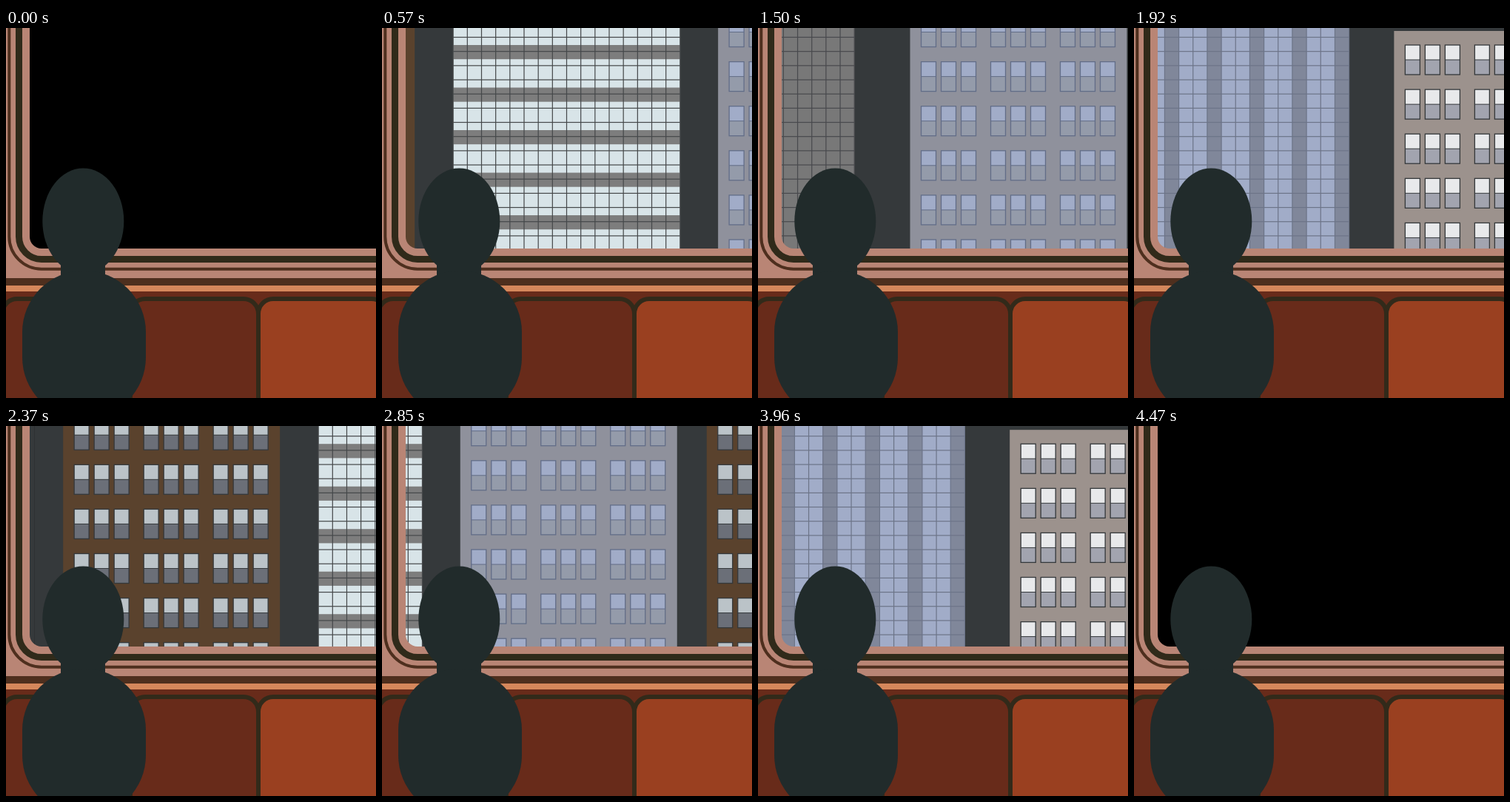
An HTML page with a canvas that plays this animation: 500 px wide and 500 px high, repeating every 4.5 s.

```html
<!DOCTYPE html>
<html lang="en">
<head>
<meta charset="utf-8">
<title>Train window</title>
<style>
  html, body { margin: 0; width: 100%; height: 100%; overflow: hidden; background: #000; }
  canvas { display: block; width: 500px; height: 500px; }
</style>
</head>
<body>
<canvas id="stage" width="500" height="500"></canvas>
<script>
const ctx = document.getElementById('stage').getContext('2d');

const LOOP = 4500, STEP = 30;
const SPEED = 1.405;              // px per ms
const CITY_LEFT = -1075, CITY_WIDTH = 2855;
const CELL = 19.17;

const BROWN = { wall: '#5a422d', top: '#bbc3c8', bottom: '#6b6f78', line: '#34383b', y: -9 };
const BLUE = { wall: '#8f919c', top: '#a1acc8', bottom: '#949baa', line: '#626d88', y: -14.5 };
const ORANGE = { wall: '#9c928d', top: '#e8e9eb', bottom: '#a2a4af', line: '#34383b', y: 23 };

const GRID = { wall: '#787878', line: '#48494d' };
const GLASS = { wall: '#a1acc8', line: '#6c7488', band: '#80879a', columns: true };
const WHITE = { wall: '#d8e4e8', line: '#45484a', band: '#7d7d7d' };

function rect(color, x, y, w, h) {
  ctx.fillStyle = color;
  ctx.fillRect(x, y, w, h);
}

function house(x, style) {
  rect(style.wall, x, style.y - 19, 293, 400);
  ctx.strokeStyle = style.line;
  ctx.lineWidth = 1.3;
  for (let row = 0; row < 6; row++) {
    for (let i = 0; i < 9; i++) {
      const wx = x + 15 + Math.floor(i / 3) * 94 + (i % 3) * 27;
      const wy = style.y + row * 60.1;
      rect(style.top, wx, wy, 20, 20);
      rect(style.bottom, wx, wy + 20, 20, 20);
      ctx.strokeRect(wx, wy, 20, 40);
      rect(style.line, wx, wy + 19.5, 20, 1);
    }
  }
}

function tower(x, style) {
  const width = 16 * CELL;
  rect(style.wall, x, -30, width, 400);
  if (style.band) {
    for (let i = 0; i < 6; i++) {
      const at = i * 3 * CELL;
      if (style.columns) rect(style.band, x + at, -30, CELL, 400);
      else rect(style.band, x, 23 + at, width, CELL);
    }
  }
  for (let i = 0; i <= 16; i++) {
    rect(style.line, x + i * CELL - 0.6, -30, 1.2, 400);
    rect(style.line, x, 12 + i * CELL - 0.1, width, 1.2);
  }
}

function city(x, y) {
  ctx.save();
  ctx.translate(x, y);
  rect('#35393b', CITY_LEFT, -30, CITY_WIDTH, 400);
  house(-1036, BROWN);
  tower(-691, WHITE);
  house(-333, BLUE);
  house(0, BROWN);
  tower(343, GRID);
  house(725, BLUE);
  tower(1093.5, GLASS);
  house(1461, ORANGE);
  ctx.restore();
}

// Left and bottom edge of the window, rounded around (48, 282)
function edge(r) {
  ctx.moveTo(48 - r, -10);
  ctx.lineTo(48 - r, 282);
  ctx.arc(48, 282, r, Math.PI, Math.PI / 2, true);
  ctx.lineTo(510, 282 + r);
}

function edgeLine(r, width, color) {
  ctx.beginPath();
  edge(r);
  ctx.lineWidth = width;
  ctx.strokeStyle = color;
  ctx.stroke();
}

function carriage() {
  ctx.beginPath();
  edge(16);
  ctx.lineTo(510, 340);
  ctx.lineTo(-10, 340);
  ctx.lineTo(-10, -10);
  ctx.fillStyle = '#b98575';
  ctx.fill();
  edgeLine(30.5, 9, '#302a1a');
  edgeLine(43.7, 4, '#4e2f1e');
  rect('#4e2f1e', 0, 338, 500, 10);
  rect('#d5875b', 0, 348, 500, 8);
  rect('#682b1a', 0, 356, 500, 144);
  ['#682b1a', '#682b1a', '#9a4020'].forEach((color, i) => {
    ctx.beginPath();
    ctx.roundRect(-5 + i * 173, 366, 173, 160, 20);
    ctx.fillStyle = color;
    ctx.fill();
    ctx.lineWidth = 6;
    ctx.strokeStyle = '#322a1a';
    ctx.stroke();
  });
}

function passenger() {
  ctx.fillStyle = '#212b2b';
  ctx.beginPath();
  ctx.ellipse(104.3, 261, 55, 71.5, 0, 0, 2 * Math.PI);
  ctx.fill();
  ctx.fillRect(74, 300, 60, 45);
  ctx.beginPath();
  ctx.roundRect(22, 328, 167, 200, 83);
  ctx.fill();
}

function draw(now) {
  const t = Math.floor((now % LOOP) / STEP) * STEP;
  const x = 1588 - SPEED * t;
  rect('#000', 0, 0, 500, 500);
  city(x, 0);
  city(x + CITY_WIDTH, 1.2);
  carriage();
  passenger();
}

let start;
function frame(now) {
  start ??= now;
  draw(now - start);
  requestAnimationFrame(frame);
}
draw(0);
requestAnimationFrame(frame);
</script>
</body>
</html>
```
